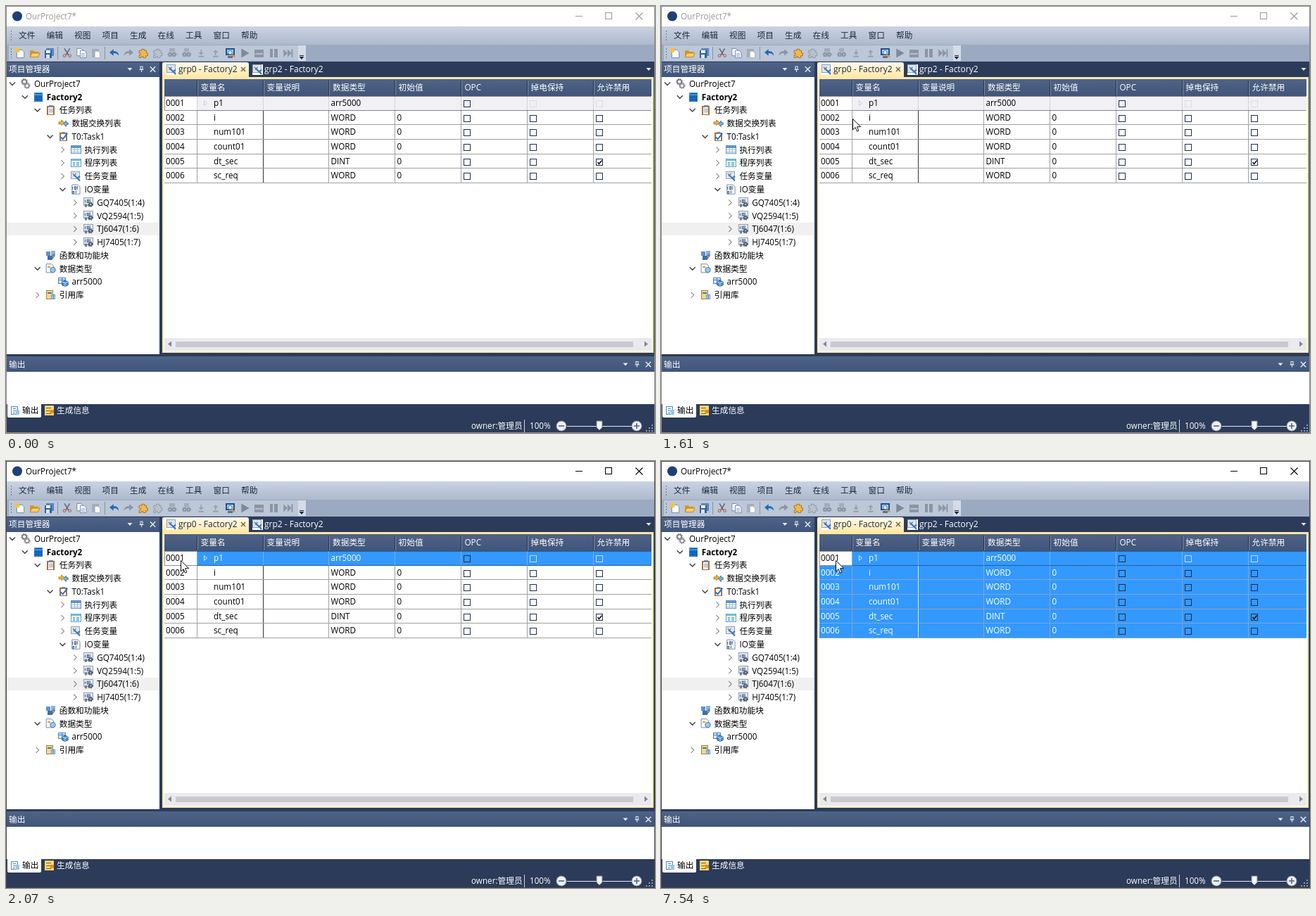
Recreate the animation shown at these times as an HTML page. Size 922 by 607 pixels, loop 8000 ms.

```html
<!DOCTYPE html>
<html lang="zh-CN">
<head>
<meta charset="utf-8">
<title>Variable table</title>
<style>
html, body { margin: 0; width: 100%; height: 100%; overflow: hidden; background: #fff; }
svg { display: block; width: 922px; height: 607px; }
text { font: 11.7px "Open Sans", "Noto Sans", "Noto Sans CJK SC", "Noto Sans CJK", sans-serif; white-space: pre; }
.tab { font-size: 12px; }
.bold { font-weight: 700; }
.caption text { font-size: 56px; font-weight: 500; fill: #fff; stroke: #f00; stroke-width: 2; }
.caption .latin { font-size: 60px; }
rect, .crisp { shape-rendering: crispEdges; }
.idle, .active, .caption, .all, .cursor { animation: 8s step-end infinite; }
.idle { animation-name: idle; }
.active { animation-name: active; }
.caption { animation-name: caption; }
.all { animation-name: all; }
.cursor { animation-name: cursor; }
@keyframes idle { 0% { opacity: 1 } 25.875%, 100% { opacity: 0 } }
@keyframes active { 0% { opacity: 0 } 25.875%, 100% { opacity: 1 } }
@keyframes caption { 0% { opacity: 0 } 30.625% { opacity: 1 } 81.625%, 100% { opacity: 0 } }
@keyframes all { 0% { opacity: 0 } 94.25%, 100% { opacity: 1 } }
@keyframes cursor {
  0% { transform: translate(507px, 640px) }
  13.25% { transform: translate(507px, 602px) }
  14.25% { transform: translate(457px, 488px) }
  15.25% { transform: translate(413px, 394px) }
  16.25% { transform: translate(374px, 318px) }
  17.25% { transform: translate(341px, 259px) }
  18.125% { transform: translate(313px, 214px) }
  19.125% { transform: translate(290px, 182px) }
  20.125% { transform: translate(272px, 160px) }
  21.125% { transform: translate(260px, 149px) }
  22.125% { transform: translate(253px, 145px) }
  23% { transform: translate(251px, 143px) }
  24%, 100% { transform: translate(248px, 141px) }
}
</style>
</head>
<body>
<svg id="stage" viewBox="0 0 922 607" xmlns="http://www.w3.org/2000/svg"></svg>
<script>
const rect = (x, y, w, h, fill, more = '') =>
  `<rect x="${x}" y="${y}" width="${w}" height="${h}" fill="${fill}" ${more}/>`;
const path = (d, fill, stroke = 'none', width = 1, more = '') =>
  `<path d="${d}" fill="${fill}" stroke="${stroke}" stroke-width="${width}" ${more}/>`;
const line = (d, color, width = 1, more = '') => path(d, 'none', color, width, more);
const crispLine = (d, color, more = '') => line(d, color, 1, `class="crisp" ${more}`);
const disc = (x, y, r, fill, stroke = 'none') =>
  `<circle cx="${x}" cy="${y}" r="${r}" fill="${fill}" stroke="${stroke}"/>`;
// y is the vertical middle of the line of text
const text = (x, y, s, fill = '#000', cls = '') =>
  `<text x="${x}" y="${y + 4.3}" fill="${fill}" class="${cls}">${s}</text>`;
const group = (cls, body) => `<g class="${cls}">${body}</g>`;
const at = (x, y, body, scale = 1) => `<g transform="translate(${x} ${y}) scale(${scale})">${body}</g>`;
const gradient = (id, ...colors) =>
  `<linearGradient id="${id}" x2="0" y2="1">${colors.map((c, i) =>
    `<stop offset="${i / (colors.length - 1)}" stop-color="${c}"/>`).join('')}</linearGradient>`;

const NAVY = '#2b3b59', BLUE = '#3399ff', GREY = '#8b94a3', STEEL = '#3d78b8', ORANGE = '#e8a02c';

// Icons, each in a box of 16 by 16
const page = (x, y, w, h, c = '#6f87a8') =>
  path(`M${x} ${y}h${w - 3}l3 3v${h - 3}h${-w}z`, '#fbfcfe', c);
const gear = (x, y, r, c) => `<circle cx="${x}" cy="${y}" r="${r}" fill="none" stroke="${c}" stroke-width="2"/>` +
  `<circle cx="${x}" cy="${y}" r="${r + 1.3}" fill="none" stroke="${c}" stroke-width="1.4" stroke-dasharray="1.5 1.6"/>`;
const clip = rect(2, 2, 12, 13, '#a8703c') + rect(4, 4, 8, 10, '#fff') + rect(5, 1, 6, 3, '#7d8796');
const bits = line('M3 4v4M6 4h2v4h-2zM10 3v5M3 11h2v3h-2zM8 10v4', '#47688f', 1.2);
const lens = disc(8, 7, 3, '#d6e8f8', STEEL) + line('M10 9l5 5', '#d18a2c', 2.2);
const icons = {
  gears: gear(6, 5, 3.2, '#7b7f87') + gear(10, 11, 3, '#8f9299'),
  station: rect(2, 1, 13, 14, '#1c6fc4') + rect(2, 1, 13, 5, '#3b93e2') + crispLine('M4 3h9M4 8h9M4 11h9', '#0e4f97'),
  list: clip + crispLine('M5 6.5h6M5 8.5h6M5 10.5h6', '#8795a8'),
  swap: path('M1 6h4V3l5 4-5 4V9H1z', '#f0b54a', '#b47816') + path('M15 7h-3V4L8 9l4 4v-3h3z', '#7bb5e6', '#3d6f9f'),
  task: clip + line('M4 9l3 3 7-9', '#1873c8', 2),
  table: rect(1, 2, 14, 12, '#fff', 'stroke="#5b86b5"') + rect(1, 2, 14, 4, '#5e96d0') +
    crispLine('M1 8.5h14M1 11.5h14M5.5 5v9M10.5 5v9', '#9cb8d4'),
  program: rect(1, 2, 14, 12, '#e8f6fc', 'stroke="#4d9fc4"') + rect(1, 2, 14, 3, '#6cbbdc') +
    crispLine('M3 7.5h4M3 9.5h4M3 11.5h4M9 7.5h4M9 9.5h4M9 11.5h4', '#4b93b4'),
  vars: rect(0, 0, 16, 16, '#fff') + rect(1, 1, 12, 11, '#dfe6ef', 'stroke="#8b9bb0"') +
    line('M3 4l5 5M8 4L4 8', '#5c7896', 1.4) + line('M6 7l4 4 4-3M10 11l4 4', STEEL, 2.2),
  io: page(2, 1, 12, 14) + bits,
  channel: rect(1, 1, 14, 11, '#e4e9f0', 'stroke="#8c9aac"') + bits + gear(11, 11, 2, '#555e6c'),
  blocks: rect(1, 2, 6, 6, '#5d92ca') + rect(8, 1, 7, 7, '#86b2dc') + rect(3, 9, 7, 6, '#3e6ea5') +
    line('M8 12l5-6M10 13l4-5', '#66707e', 1.6),
  types: page(1, 1, 11, 13) + rect(3, 4, 4, 3, ORANGE) + disc(11, 10, 4, '#9bc6ea', STEEL),
  type: rect(1, 2, 10, 9, '#d8e9f7', `stroke="${STEEL}"`) + crispLine('M1 5.5h10M5.5 2v9', STEEL) +
    path('M10.5 6l4.5 2v5l-4.5 2L6 13V8z', '#4a8ecb', '#235f9c') + line('M6 8l4.5 2L15 8M10.5 10v5', '#d4e8f8'),
  library: rect(1, 1, 10, 13, '#f5d98c', 'stroke="#9b7c35"') + rect(3, 4, 6, 2, STEEL) + rect(8, 7, 7, 8, '#5d92ca') +
    line('M10 8v6M13 8v6', '#e4eef8'),
  create: page(3, 3, 11, 12) + rect(1, 1, 6, 6, '#f5c33b'),
  open: path('M1 4h5l2 2h6v8H1z', '#d9951f') + path('M4 8h12l-3 6H1z', '#ffd06b', '#c08322'),
  save: rect(3, 1, 12, 11, '#5687c2') + rect(1, 4, 11, 11, '#2f629f') + rect(3, 4, 7, 4, '#fff') + rect(4, 10, 5, 5, '#dce8f4'),
  cut: line('M4 1l6 10M12 1L6 11', '#5d6a7c', 1.7) + disc(4, 12, 2, 'none', '#c2452f') + disc(12, 12, 2, 'none', '#c2452f'),
  copy: page(1, 1, 9, 11) + page(6, 4, 9, 11) + crispLine('M8 8.5h5M8 10.5h5M8 12.5h5', '#8ca4c0'),
  paste: rect(2, 2, 10, 12, '#a3adbb') + page(6, 5, 8, 10, '#a3adbb'),
  undo: path('M1 7l6-5v3c5 0 8 2 8 7-2-3-4-4-8-4v4z', '#2467b0'),
  redo: path('M15 7L9 2v3c-5 0-8 2-8 7 2-3 4-4 8-4v4z', GREY),
  build: path('M2 4h4V2h4v2h3v4h2v4h-3v3H8v-2H5v2H2v-4h2V8H2z', '#f2b949', '#a9731c'),
  rebuild: path('M2 4h4V2h4v2h3v4h2v4h-3v3H8v-2H5v2H2v-4h2V8H2z', '#b9c1cc', '#8e98a7'),
  link: gear(5, 10, 2, GREY) + gear(11, 10, 2, GREY) + rect(4, 1, 8, 5, '#a3acb9'),
  down: path('M7 3h2v4h3l-4 4-4-4h3zM4 12h8v2H4z', '#96a0af'),
  up: path('M7 11h2V7h3L8 3 4 7h3zM4 12h8v2H4z', '#96a0af'),
  monitor: rect(1, 1, 14, 10, '#274f85') + rect(3, 3, 10, 6, '#9fd0ee') + rect(4, 12, 8, 3, '#5f7187') + lens,
  play: path('M3 1l12 7-12 7z', '#7f8998'),
  stop: rect(1, 3, 14, 11, '#8b95a4') + rect(2, 8, 12, 2, '#b8c0cc'),
  pause: rect(2, 2, 5, 12, '#8b95a4') + rect(9, 2, 5, 12, '#8b95a4'),
  step: path('M1 2l6 6-6 6zM7 2l6 6-6 6zM13 2h2v12h-2z', '#8b95a4'),
  output: rect(2, 2, 9, 12, '#eef5fc', 'stroke="#4f86bd"') + crispLine('M4 5.5h5M4 8.5h5M4 11.5h3', '#4f86bd') + rect(9, 7, 5, 7, '#9cc5e6'),
  log: rect(1, 1, 14, 14, '#ffd774') + crispLine('M3 4.5h8M3 8.5h6M3 12.5h8', '#7a5a1d') + path('M9 7h6v5H9z', '#e28a23')
};
const icon = (name, x, y, scale = 0.94) => at(x, y - 8 * scale, icons[name], scale);

const cross = (x, y, r, c, w = 1.5) => line(`M${x - r} ${y - r}l${2 * r} ${2 * r}m0 ${-2 * r}l${-2 * r} ${2 * r}`, c, w);
const arrow = (x, y, c) => path(`M${x - 3.5} ${y - 2}h7l-3.5 4z`, c);
const pin = (x, y) => line(`M${x - 1.5} ${y - 4}h3v4h-3zM${x - 3} ${y + 0.5}h6M${x} ${y + 1}v3`, '#dfe6f0', 1.1);
const panelTools = (x, y) => arrow(x, y, '#e3e9f2') + pin(x + 16.5, y) + cross(x + 32.5, y, 3.7, '#e3e9f2');

function windowChrome() {
  const menus = ['文件', '编辑', '视图', '项目', '生成', '在线', '工具', '窗口', '帮助'];
  const tools = ['create', 'open', 'save', '', 'cut', 'copy', 'paste', '', 'undo', 'redo', 'build', 'rebuild',
    'link', 'link', 'down', 'up', 'monitor', 'play', 'stop', 'pause', 'step'];
  let x = 20;
  const bar = tools.map(name => {
    if (!name) { x += 5; return crispLine(`M${x - 13.5} 58v18`, '#8592a8'); }
    const body = icon(name, x - 7.5, 67);
    x += 20.6;
    return body;
  }).join('');
  return rect(0, 0, 922, 607, NAVY) + rect(0, 0, 922, 29, '#fff') + disc(16, 14.5, 7, '#1f3f77') +
    rect(0, 29, 922, 26, 'url(#menu)') + menus.map((m, i) => text(18 + 39.5 * i, 42, m, '#1b293e')).join('') +
    rect(0, 55, 922, 24, '#9caac1') + rect(4, 56, 422, 22, '#bcc7d8') + rect(415, 56, 11, 22, '#d5dce8') +
    crispLine('M7.5 35v14M7.5 60v14', '#6a7a94', 'stroke-dasharray="2 2"') + bar +
    crispLine('M417 70.5h6', '#1b293e') + arrow(420, 74, '#1b293e');
}

function titleBar(color, border) {
  return text(28, 15, 'OurProject7*', color) +
    crispLine('M809 14.5h10M851.5 9.5h9v9h-9z', color) + cross(899.5, 14.5, 5, color, 1.1) +
    rect(0.5, 0.5, 921, 606, 'none', `stroke="${border}"`);
}

// depth, fold mark (v open, > closed), icon, label
const tree = [
  [0, 'v', 'gears', 'OurProject7'], [1, 'v', 'station', 'Factory2'], [2, 'v', 'list', '任务列表'],
  [3, '', 'swap', '数据交换列表'], [3, 'v', 'task', 'T0:Task1'], [4, '>', 'table', '执行列表'],
  [4, '>', 'program', '程序列表'], [4, '>', 'vars', '任务变量'], [4, 'v', 'io', 'IO变量'],
  [5, '>', 'channel', 'GQ7405(1:4)'], [5, '>', 'channel', 'VQ2594(1:5)'], [5, '>', 'channel', 'TJ6047(1:6)'],
  [5, '>', 'channel', 'HJ7405(1:7)'], [2, '', 'blocks', '函数和功能块'], [2, 'v', 'types', '数据类型'],
  [3, '', 'type', 'arr5000'], [2, '>', 'library', '引用库']
];

function treePanel() {
  const rows = tree.map(([depth, fold, name, label], i) => {
    const y = 110.5 + 18.77 * i, x = 17.85 * depth;
    const mark = fold === 'v' ? line(`M${x + 5} ${y - 2}l4 4 4-4`, '#404040', 1.4)
      : fold ? line(`M${x + 7} ${y - 4}l4 4-4 4`, '#8f8f8f', 1.2) : '';
    return mark + icon(name, x + 20.5, y) + text(x + 40, y, label, '#000', i === 1 ? 'bold' : '');
  }).join('');
  return rect(0, 80, 218, 21, 'url(#panel)') + text(4, 90, '项目管理器', '#fff') + panelTools(176, 90) +
    rect(1, 101, 217, 394, '#fff') + rect(1, 308, 217, 18, '#f0f0f0') + rows;
}

const cols = [225, 272, 366, 459.5, 553, 647, 741, 835];
const heads = ['', '变量名', '变量说明', '数据类型', '初始值', 'OPC', '掉电保持', '允许禁用'];
const data = [['p1', 'arr5000', ''], ['i', 'WORD', 0], ['num101', 'WORD', 0], ['count01', 'WORD', 0],
  ['dt_sec', 'DINT', 0], ['sc_req', 'WORD', 0]];
const rowTop = i => Math.round(128 + 20.65 * i);

function gridRow(i, selected) {
  const top = rowTop(i), height = rowTop(i + 1) - top, y = top + 10;
  const ink = selected ? '#fff' : '#000', rule = selected ? '#8aa3bf' : '#a0a0a0';
  const [name, type, init] = data[i];
  const fill = selected ? BLUE : i ? '#fff' : '#f0f0f5';
  const boxes = [5, 6, 7].map(c => {
    const x = Math.floor(cols[c]) + 3.5, faint = !i && c > 5;
    const edge = faint ? (selected ? '#c5defa' : '#dcdce0') : '#1e2f4d';
    return rect(x, y - 3.5, 9, 9, selected || !i ? 'none' : '#fff', `stroke="${edge}"`) +
      (i === 4 && c === 7 ? line(`M${x + 2} ${y + 1}l2 2.5 4-5`, '#111', 1.6) : '');
  }).join('');
  const rules = cols.slice(1).map((x, c) =>
    crispLine(`M${Math.floor(x) - 0.5} ${top}v${height}`,
      c === 1 && i ? (selected ? '#cfe4fa' : '#333') : i ? rule : selected ? '#6fb2f2' : '#d2d2d8')).join('');
  const focus = i ? '' : rect(225, top, 46, height, '#fff') +
    crispLine(`M225 ${top + 0.5}h692M225 ${top + height - 0.5}h692M225.5 ${top}v${height}`, '#222', 'stroke-dasharray="1 1"') +
    path(`M281.5 ${y - 3.5}l4 3.5-4 3.5z`, 'none', selected ? '#d8eaff' : '#cfcfd4');
  return rect(225, top, 692, height, fill) + rules +
    (i ? crispLine(`M225 ${top + height - 0.5}h692`, rule) : focus) +
    text(227, y, '000' + (i + 1), i ? ink : '#000') + text(295, y, name, ink) +
    text(461.5, y, type, ink) + text(555.5, y, init, ink) + boxes;
}
const lowerRows = selected => [1, 2, 3, 4, 5].map(i => gridRow(i, selected)).join('');

function editor() {
  return path('M222 101V82q0-2 2-2h118q3 0 3 3v18z', 'url(#tab)') +
    icon('vars', 228, 90.5) + text(245, 90, 'grp0 - Factory2', '#1b293e', 'tab') + cross(337, 90, 3, '#6b5c33', 1.3) +
    icon('vars', 350, 90.5) + text(367, 90, 'grp2 - Factory2', '#fff', 'tab') + arrow(913, 90, '#e3e9f2') +
    rect(222, 101, 698, 392, '#ffe8a6') + rect(224, 104, 694, 387, '#fff') + rect(225, 104, 692, 24, 'url(#panel)') +
    cols.map((x, c) => (c ? crispLine(`M${Math.floor(x) - 0.5} 106v21`, '#20304c') +
      crispLine(`M${Math.floor(x) + 0.5} 106v21`, '#7e90ae') : '') + text(x + 4.5, 116, heads[c], '#fff')).join('') +
    rect(225, 472, 692, 18, '#e9e9ee') + rect(241, 477, 650, 8, '#c9c9ce') +
    path('M235 476.5v8l-5-4z', '#84888f') + path('M907 476.5v8l5-4z', '#84888f');
}

function bottomPanels() {
  const knob = (x, sign) => disc(x, 597, 7, '#eef1f6', '#8f9aae') + line(`M${x - 4} 597h8${sign}`, '#53627d', 1.6);
  let grip = '';
  for (let r = 0; r < 3; r++) for (let c = 0; c <= r; c++) grip += rect(917 - 4 * c, 595 + 4 * r, 2, 2, '#8e9bb4');
  return rect(0, 498, 922, 22, 'url(#panel)') + text(4, 510, '输出', '#fff') + panelTools(880, 509.5) +
    rect(1, 520, 920, 46, '#fff') + path('M2 566h48v17q0 2-2 2H4q-2 0-2-2z', '#fff') +
    icon('output', 6, 575) + text(23, 575, '输出') + icon('log', 54, 575) + text(72, 575, '生成信息', '#fff') +
    text(661, 597, 'owner:管理员', '#fff') + crispLine('M736.5 588v18', '#c9d2e0') + text(744, 597, '100%', '#fff') +
    crispLine('M797 597.5h92', '#e8ecf3') + knob(789, '') + knob(896, 'm-4-4v8') +
    path('M839 590h8v9l-4 4-4-4z', '#f4f6fa', '#76839b') + grip;
}

const caption = [[26, '快捷键'], [209, '“', 1], [234, 'Ctrl', 1], [351, '+', 1], [402, 'A', 1], [441, '”', 1],
  [467, '可选中所有变量'], [876, '；']]
  .map(([x, s, latin]) => `<text x="${x}" y="325" class="${latin ? 'latin' : ''}">${s}</text>`).join('');

document.getElementById('stage').innerHTML =
  `<defs>${gradient('menu', '#cad3e2', '#aeb9cd')}${gradient('panel', '#4f6386', '#40557a')}` +
  `${gradient('tab', '#fffbef', '#fff1cc', '#ffe8a6')}</defs>` +
  windowChrome() + treePanel() + editor() + lowerRows(false) + bottomPanels() +
  group('idle', titleBar('#999', '#8a8a8a') + gridRow(0, false)) +
  group('active', titleBar('#000', '#444') + gridRow(0, true)) +
  group('all', lowerRows(true)) +
  group('caption', caption) +
  group('cursor', path('M.5 .5v15.5l3.6-3.4 2.4 5.6 2.4-1-2.4-5.5h5z', '#fff', '#111'));
</script>
</body>
</html>
```
